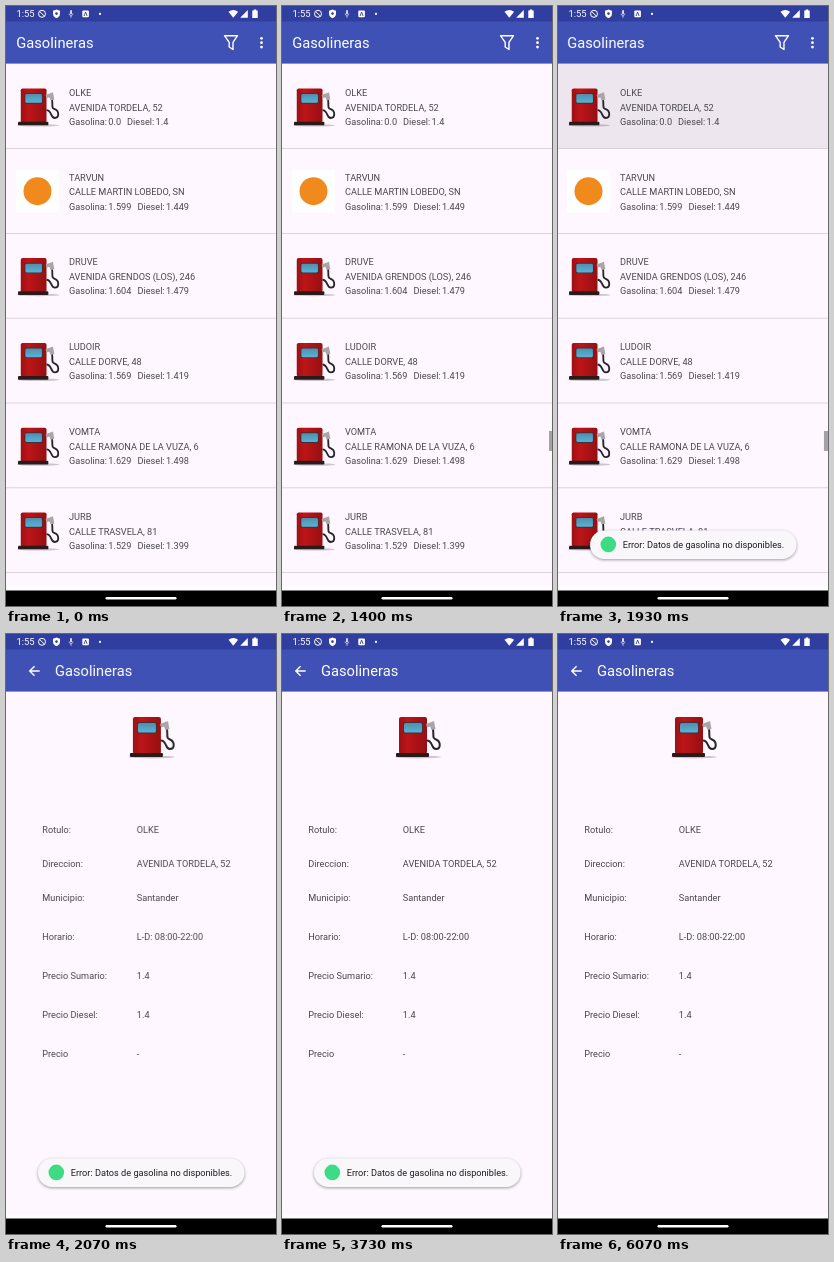
Animation of 270x600 px, one loop 6140 ms. Source, as an HTML page:

```html
<!DOCTYPE html>
<html lang="es">
<head>
<meta charset="utf-8">
<title>Gasolineras</title>
<style>
  html, body { margin: 0; width: 100%; height: 100%; overflow: hidden; background: #fef7ff; }
  svg { display: block; width: 270px; height: 600px; }
  text { font: 9.2px Roboto, sans-serif; fill: #49454f; }
  text.title { font-size: 14.7px; fill: #fff; }
  text.clock { font-size: 9.4px; fill: #fff; }
  text.toast { fill: #1c1b1f; }
  .card { filter: drop-shadow(0 1px 1.5px rgba(0, 0, 0, .38)); }
</style>
</head>
<body>
<svg viewBox="0 0 270 600">
  <defs>
    <linearGradient id="red">
      <stop offset="0" stop-color="#9c1014"/>
      <stop offset=".3" stop-color="#bd1518"/>
      <stop offset="1" stop-color="#960f12"/>
    </linearGradient>
    <linearGradient id="glass" x2="0" y2="1">
      <stop offset="0" stop-color="#4f8fb0"/>
      <stop offset="1" stop-color="#56b4d6"/>
    </linearGradient>
    <g id="pump">
      <ellipse cx="22" cy="41" rx="23" ry="1.4" fill="#000" opacity=".2"/>
      <rect x="3" y="1" width="28" height="37" rx="2" fill="url(#red)"/>
      <rect x="7" y="6" width="20" height="11.5" rx="2" fill="#4a2c34"/>
      <rect x="8" y="7" width="18" height="9.5" rx="1.5" fill="url(#glass)"/>
      <rect y="37" width="33" height="4" rx="1" fill="#2b1a1b"/>
      <path d="M37 13C38 20 36 22 40 23.5C45 25.500 45 33 40 33C35 33 37 24.500 31 24.500" fill="none" stroke="#27252a" stroke-width="2"/>
      <path d="M30 8L38 5L39.500 13L35.500 14L34 10.500L31 11.500Z" fill="#aaa6a8"/>
    </g>
    <g id="bar">
      <rect x="-40" y="15" width="350" height="565" fill="#fef7ff"/>
      <rect x="-40" y="15" width="350" height="42.600" fill="#3f51b5"/>
    </g>
  </defs>

  <rect width="270" height="600" fill="#fef7ff"/>

  <g id="list">
    <use href="#bar"/>
    <text class="title" x="10.300" y="42">Gasolineras</text>
    <path d="M218.500 29.700H231.500L227 36.300V43.500L223.200 41V36.300Z" fill="none" stroke="#fff" stroke-width="1.400" stroke-linejoin="round"/>
    <g fill="#fff">
      <circle cx="255.500" cy="32.300" r="1.400"/>
      <circle cx="255.500" cy="36.700" r="1.400"/>
      <circle cx="255.500" cy="41.100" r="1.400"/>
    </g>
    <rect id="press" x="-40" y="57.600" width="350" height="85.400"/>
    <g id="rows"></g>
    <rect id="thumb" x="267" y="425" width="6" height="20" fill="#a5a1a6"/>
  </g>

  <g id="detail">
    <use href="#bar"/>
    <path d="M23.700 37H14M18.600 32.200L13.800 37L18.600 41.800" fill="none" stroke="#fff" stroke-width="1.400"/>
    <text class="title" x="39" y="42">Gasolineras</text>
    <use href="#pump" x="114" y="82"/>
    <g id="fields"></g>
  </g>

  <rect y="580" width="270" height="5" fill="#fffcff"/>
  <rect y="584.500" width="270" height="15.500"/>
  <rect x="99.500" y="591" width="71" height="2.400" rx="1.200" fill="#fff"/>

  <g id="status">
    <rect width="270" height="15.500" fill="#303f9f"/>
    <text class="clock" x="10.500" y="11.200">1:55</text>
    <g fill="none" stroke="#fff">
      <circle cx="36" cy="7.800" r="3.500"/>
      <path d="M33.600 5.400L38.400 10.200"/>
      <path d="M63.200 7.500C63.200 10.500 66.800 10.500 66.800 7.500M65 9.800V11.800" stroke-width=".8" opacity=".8"/>
    </g>
    <g fill="#fff">
      <path d="M50.500 3.500L54 4.800V7.700C54 10 52.500 11.500 50.500 12.300C48.500 11.500 47 10 47 7.700V4.800Z"/>
      <circle cx="50.500" cy="7.600" r="1.300" fill="#303f9f"/>
      <rect x="64" y="4" width="2" height="4.500" rx="1" opacity=".8"/>
      <rect x="76.300" y="4.500" width="6.600" height="6.800" rx="1"/>
      <path d="M78.100 10L79.600 6L81.100 10" fill="none" stroke="#303f9f" stroke-width=".9"/>
      <circle cx="94" cy="7.900" r="1.100"/>
      <path d="M222.500 5.800Q227.300 2 232.100 5.800L227.300 11.700Z"/>
      <path d="M234.200 11.700L241.800 4V11.700Z"/>
      <path d="M246.300 4.600H247.800V3.600H250.200V4.600H251.700V11.900H246.300Z"/>
    </g>
  </g>

  <g id="toast">
    <rect class="card" x="32" y="524.500" width="206.500" height="28.500" rx="14.200" fill="#faf7fb"/>
    <circle cx="50.300" cy="538.400" r="7.800" fill="#3ddc84"/>
    <text class="toast" x="64.700" y="542">Error: Datos de gasolina no disponibles.</text>
  </g>
</svg>
<script>
const LOOP = 6140;
const $ = id => document.getElementById(id);

const stations = [
  ["OLKE", "AVENIDA TORDELA, 52", "0.0", "1.4"],
  ["TARVUN", "CALLE MARTIN LOBEDO, SN", "1.599", "1.449"],
  ["DRUVE", "AVENIDA GRENDOS (LOS), 246", "1.604", "1.479"],
  ["LUDOIR", "CALLE DORVE, 48", "1.569", "1.419"],
  ["VOMTA", "CALLE RAMONA DE LA VUZA, 6", "1.629", "1.498"],
  ["JURB", "CALLE TRASVELA, 81", "1.529", "1.399"]
];

const fields = [
  ["Rotulo:", stations[0][0], 199],
  ["Direccion:", stations[0][1], 232.8],
  ["Municipio:", "Santander", 266.6],
  ["Horario:", "L-D: 08:00-22:00", 305.5],
  ["Precio Sumario:", "1.4", 344.7],
  ["Precio Diesel:", "1.4", 383.6],
  ["Precio", "-", 422.5]
];

const text = (x, y, s) => `<text x="${x}" y="${y}">${s}</text>`;
const badge = `<rect x="10" y="79.200" width="43" height="42.500" fill="#fff"/>
  <circle cx="31.500" cy="100.400" r="14" fill="#f08a1d"/>`;
const pump = `<use href="#pump" transform="translate(12 81.600) scale(.92)"/>`;

$("rows").innerHTML = stations.map(([name, street, gas, diesel], i) =>
  `<g transform="translate(0 ${i * 84.8})">
    ${i === 1 ? badge : pump}
    ${text(63, 89.8, name)}${text(63, 104.5, street)}
    ${text(63, 118.9, `Gasolina:<tspan dx="1.3">${gas}</tspan><tspan dx="6">Diesel:</tspan><tspan dx="1.3">${diesel}</tspan>`)}
    <rect x="-40" y="142.200" width="350" height=".8" fill="#d3cdd4"/>
  </g>`).join("");

$("fields").innerHTML = fields.map(([label, value, y]) =>
  text(26.3, y, label) + text(120.8, y, value)).join("");

// Each track is a list of [time in ms, value]; the ends are held.
function play(id, prop, track) {
  const steps = [[0, track[0][1]], ...track, [LOOP, track[track.length - 1][1]]];
  $(id).animate(
    steps.map(([t, v]) => ({ offset: t / LOOP, [prop]: v })),
    { duration: LOOP, iterations: Infinity }
  );
}
const slide = (id, track) =>
  play(id, "transform", track.map(([t, x]) => [t, `translateX(${x}px)`]));

play("thumb", "opacity", [[199, 0], [200, 1]]);
play("press", "opacity", [[1620, 0], [1740, .07]]);
slide("list", [[1880, 0], [1930, -1], [1965, -3], [2000, -11], [2070, -17], [2300, -27]]);
slide("detail", [[1930, 26], [1965, 24], [2000, 16], [2070, 10], [2140, 4], [2270, 1], [2450, 0]]);
play("detail", "opacity", [[1960, 0], [2050, 1]]);
play("toast", "opacity", [[1800, 0], [1910, 1], [3830, 1], [3980, 0]]);
</script>
</body>
</html>
```
